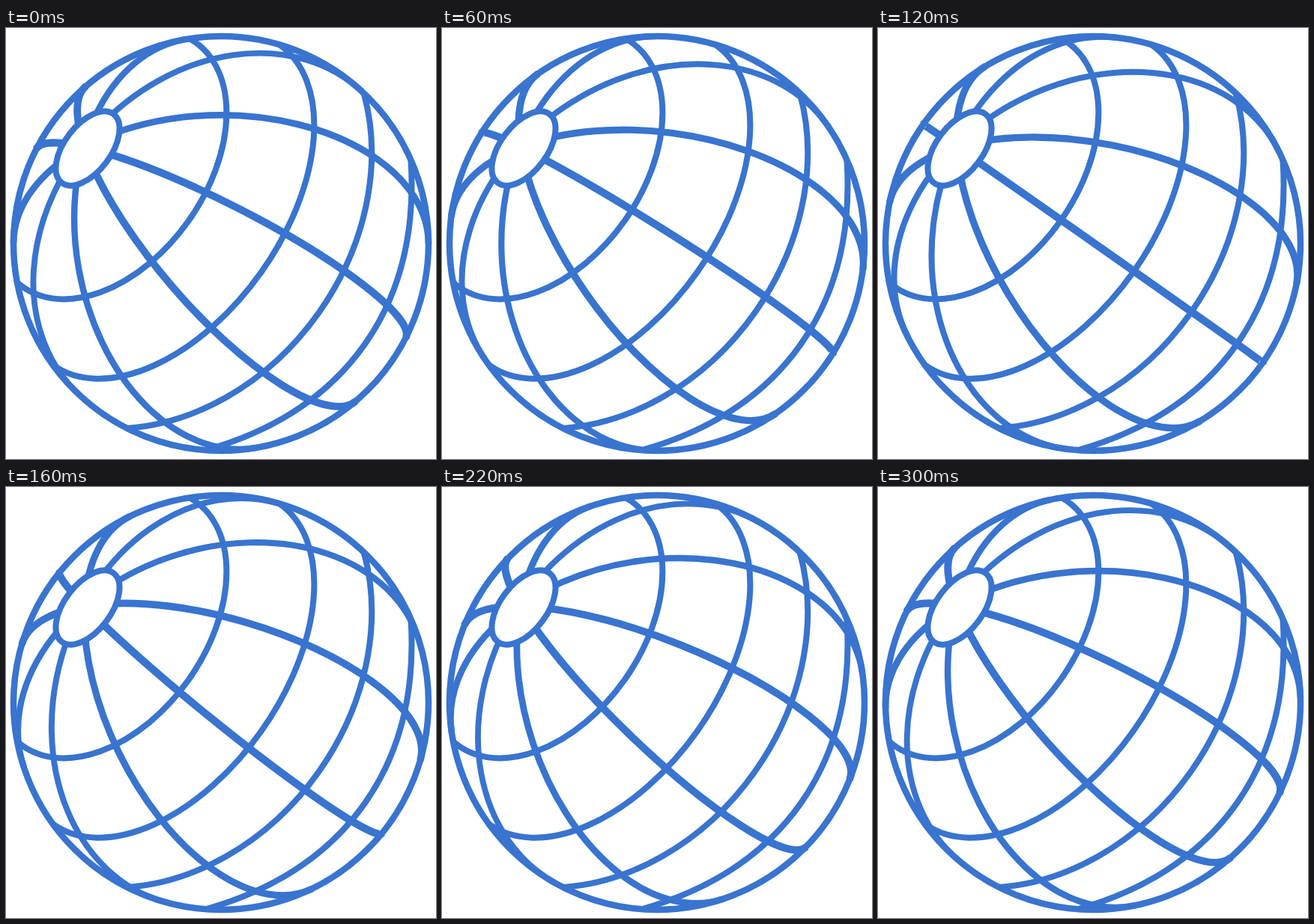
An HTML page without scripts for the animation above (0.32 s loop, 574 by 576 pixels).

```html
<!DOCTYPE html>
<html lang="en">
<head>
<meta charset="utf-8">
<title>Spinning wire globe</title>
<style>
  @property --step {
    syntax: "<number>";
    inherits: true;
    initial-value: 0;
  }

  html, body {
    margin: 0;
    width: 100%;
    height: 100%;
    overflow: hidden;
    background: #fff;
  }

  svg {
    display: block;
    width: 574px;
    height: 576px;
    fill: none;
    stroke: #3874d0;
    stroke-width: 8px;
    animation: spin 320ms step-end infinite;
  }

  /* Front half of a great circle through the tilted pole, seen from longitude --lon. */
  .meridian {
    --lon: calc(13.4deg + var(--k) * 36deg - var(--step) * 36deg / 22);
    transform:
      rotate(calc(35.3deg - atan2(0.605 * sin(var(--lon)), cos(var(--lon)))))
      scale(277, calc(226 * sin(var(--lon))));
    vector-effect: non-scaling-stroke;
    stroke-width: calc(7.8px + 2.4px * cos(var(--lon)) * cos(var(--lon)));
  }

  .cap { fill: #fff; }
  .limb { stroke-width: 8.5px; }

  /* 22 small turns per meridian gap, some of them skipped. */
  @keyframes spin {
    0% { --step: 0; }
    6.25% { --step: 2; }
    12.5% { --step: 3; }
    18.75% { --step: 5; animation-timing-function: steps(3); }
    37.5% { --step: 8; animation-timing-function: steps(3); }
    56.25% { --step: 14; }
    62.5% { --step: 15; }
    68.75% { --step: 17; animation-timing-function: steps(5); }
    100% { --step: 22; }
  }
</style>
</head>
<body>
<svg viewBox="0 0 574 576">
  <g transform="translate(287 288)">
    <path class="meridian" style="--k:-2" d="M-1 0A1 1 0 0 1 1 0"/>
    <path class="meridian" style="--k:-1" d="M-1 0A1 1 0 0 1 1 0"/>
    <path class="meridian" style="--k:0" d="M-1 0A1 1 0 0 1 1 0"/>
    <path class="meridian" style="--k:1" d="M-1 0A1 1 0 0 1 1 0"/>
    <path class="meridian" style="--k:2" d="M-1 0A1 1 0 0 1 1 0"/>
    <g transform="rotate(35.2)">
      <path d="M-192-199.5A130 200 0 1 1-192 199.5"/>
      <path d="M-89-262A155 262 0 0 1-89 262"/>
      <path d="M40-274A271 330 0 0 1 40 274"/>
      <path d="M143-237A1125 600 0 0 1 143 237"/>
    </g>
    <ellipse class="cap" rx="31" ry="57.4" transform="translate(-178 -127) rotate(37)"/>
    <circle class="limb" r="277"/>
  </g>
</svg>
</body>
</html>
```
